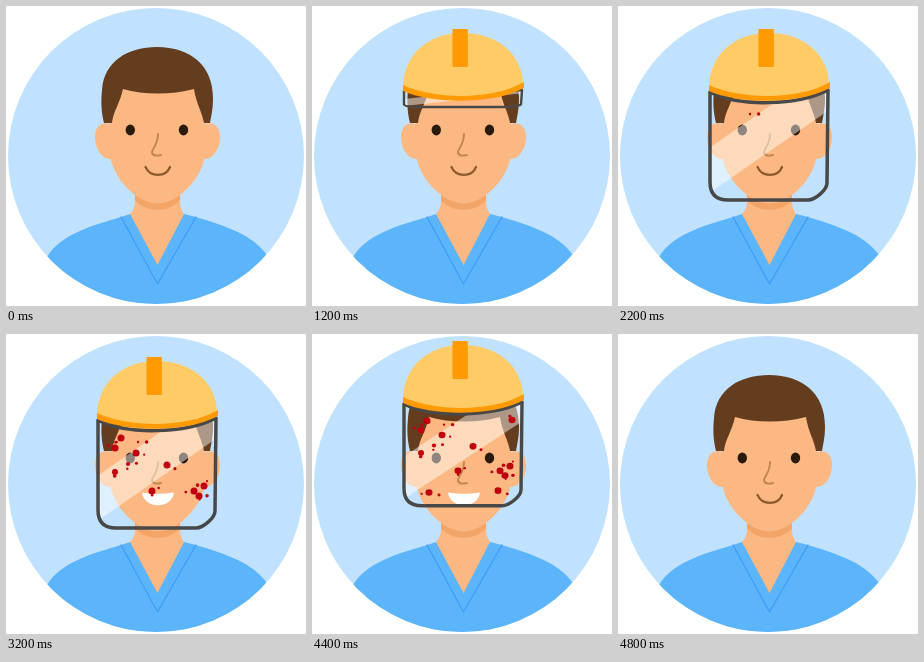
Animation, 300 px wide and 300 px high, one loop 5000 ms. Source, as an HTML page with a canvas:

```html
<!DOCTYPE html>
<html lang="en">
<head>
<meta charset="utf-8">
<title>Face shield</title>
<style>
html, body { margin: 0; width: 100%; height: 100%; overflow: hidden; background: #fff; }
canvas { display: block; width: 100vmin; height: 100vmin; }
</style>
</head>
<body>
<canvas id="stage"></canvas>
<script>
const LOOP = 5000, STEP = 50, SIZE = 300;
const HINGE = 84, FOLDED = 0.155, AXIS = 151.5;
const SKIN = '#fcb882', HAIR = '#643c1e', ORANGE = '#ff9a00';

const canvas = document.getElementById('stage');
const ctx = canvas.getContext('2d');
const ratio = window.devicePixelRatio || 1;
canvas.width = canvas.height = SIZE * ratio;

const shapes = {
  shirt: 'M36 300 L41 251 C54 229 84 220 115 211 L124 208 H178 L190 211 C219 220 246 228 261 249 L266 300 Z',
  neck: 'M129 165 V195 Q129 203 124 208 L151.5 259 L178 208 Q174 203 174 195 V165 Z',
  neckShade: 'M129 186 H174 V194 C164 207 139 207 129 194 Z',
  collar: 'M115 211 L151.5 278 L190 211',
  ear: 'M106 119 C96 114 89 120 89 131 C89 143 96 154 106 153 Z',
  head: 'M104 80 V148 C106 172 131 197.5 151.5 197.5 C172 197.5 197 172 199 148 V80 Z',
  hair: 'M98 117 C95 105 95 95 96 84 C98 55 122 41 151 41 C185 41 207 60 207 92 C207 104 205 111 204 117 H198 C196 106 190 97 188 83 C165 89 138 89 117 83 C114 97 107 106 106 117 Z',
  nose: 'M152 128 C152 140 145 143 146 147 Q148 151 155 149',
  smile: 'M139.5 161 C144 171.5 160 171.5 164 161',
  grin: 'M136 158.5 Q152 161 168 158.5 C166 175.5 138 175.5 136 158.5 Z',
  dome: 'M91 82 C91 50 115 27 151 27 C187 27 211 50 211 79 C180 98 120 97 91 82 Z',
  brim: 'M91 79 C120 93 180 95 212 76 V82 C180 99 120 98 91 85 Z',
  visor: 'M92 86 V176 Q92 194 110 194 H190 C197 194 209 184 209 177 L210 84 C180 100 120 101 92 86 Z',
  glare: 'M90 143 L176 83 L214 80 V102 L90 188 Z'
};
for (const name in shapes) shapes[name] = new Path2D(shapes[name]);

function fill(path, color) {
  ctx.fillStyle = color;
  ctx.fill(path);
}

function stroke(path, color, width) {
  ctx.strokeStyle = color;
  ctx.lineWidth = width;
  ctx.stroke(path);
}

function oval(x, y, rx, ry, color) {
  ctx.fillStyle = color;
  ctx.beginPath();
  ctx.ellipse(x, y, rx, ry, 0, 0, Math.PI * 2);
  ctx.fill();
}

const clamp = v => Math.min(1, Math.max(0, v));
const progress = (t, from, to) => clamp((t - from) / (to - from));
const easeOut = u => 1 - (1 - u) ** 2;

function seeded(seed) {
  return () => (seed = seed * 16807 % 2147483647) / 2147483647;
}

// Each hit lands one main drop with one or two small ones scattered around it.
const HIT_START = 2200, HIT_GAP = 100;
const hits = [
  [132, 108], [122, 130], [109, 138], [146, 157], [161, 131], [198, 152], [188, 157],
  [193, 162], [109, 114], [115, 104], [130, 119], [117, 180], [186, 178], [200, 103]
];
const random = seeded(42);
const splashes = hits.map(([x, y], i) => {
  const drops = [{ x, y, r: Math.min(3.5, 1.2 + 0.9 * i) }];
  for (let k = 0; k <= i % 2; k++) {
    const angle = random() * Math.PI * 2, far = 6 + 5 * random();
    drops.push({
      x: Math.min(201, Math.max(102, x + far * Math.cos(angle))),
      y: y + 0.6 * far * Math.sin(angle),
      r: 1 + random()
    });
  }
  return drops;
});

function drawPerson(grinning) {
  fill(shapes.shirt, '#5cb5fa');
  fill(shapes.neck, SKIN);
  fill(shapes.neckShade, '#f3a467');
  stroke(shapes.collar, '#3d9bf8', 1.2);
  const ears = new Path2D(shapes.ear);
  ears.addPath(shapes.ear, new DOMMatrix([-1, 0, 0, 1, 2 * AXIS, 0]));
  fill(ears, SKIN);
  fill(shapes.head, SKIN);
  fill(shapes.hair, HAIR);
  for (const x of [124.3, 177.5]) oval(x, 124, 4.7, 5.4, '#2a1a0c');
  stroke(shapes.nose, '#c5854f', 1.9);
  if (grinning) fill(shapes.grin, '#fff');
  else stroke(shapes.smile, '#8f5a2b', 2.2);
}

function drawVisor(t, open) {
  const squash = new DOMMatrix([1, 0, 0, open, 0, HINGE * (1 - open)]);
  const frame = new Path2D(), glare = new Path2D();
  frame.addPath(shapes.visor, squash);
  glare.addPath(shapes.glare, squash);

  ctx.save();
  ctx.clip(frame);
  fill(glare, 'rgba(255,255,255,.47)');
  ctx.restore();
  stroke(frame, '#484848', 2.4 + 1.1 * progress(open, FOLDED, 1));

  const count = Math.max(0, Math.floor((t - HIT_START) / HIT_GAP) + 1);
  for (const { x, y, r } of splashes.slice(0, count).flat())
    oval(x, HINGE + (y - HINGE) * open, r, r * open, '#c0000f');
}

function drawHelmet() {
  fill(shapes.dome, '#ffcb66');
  fill(shapes.brim, ORANGE);
  ctx.fillStyle = ORANGE;
  ctx.fillRect(140.5, 23, 15.3, 38);
}

function draw(t) {
  ctx.setTransform(ratio, 0, 0, ratio, 0, 0);
  ctx.clearRect(0, 0, SIZE, SIZE);
  ctx.lineCap = ctx.lineJoin = 'round';
  ctx.save();
  oval(150, 150, 148, 148, '#c1e2ff');
  ctx.clip();
  drawPerson(t >= 3000 && t < 4500);

  if (t >= 700 && t < 4800) {
    const arrive = easeOut(progress(t, 650, 1200));
    const leave = progress(t, 4150, 4800);
    const lower = easeOut(progress(t, 1450, 1950));
    const open = (FOLDED + (1 - FOLDED) * lower) * (1 - leave ** 3);
    ctx.translate(0, -121 * (1 - arrive) - 108 * leave ** 2);
    drawVisor(t, open);
    drawHelmet();
  }
  ctx.restore();
}

const start = performance.now();
function tick() {
  const t = (performance.now() - start) % LOOP;
  draw(Math.floor(t / STEP) * STEP);
  requestAnimationFrame(tick);
}
tick();
</script>
</body>
</html>
```
